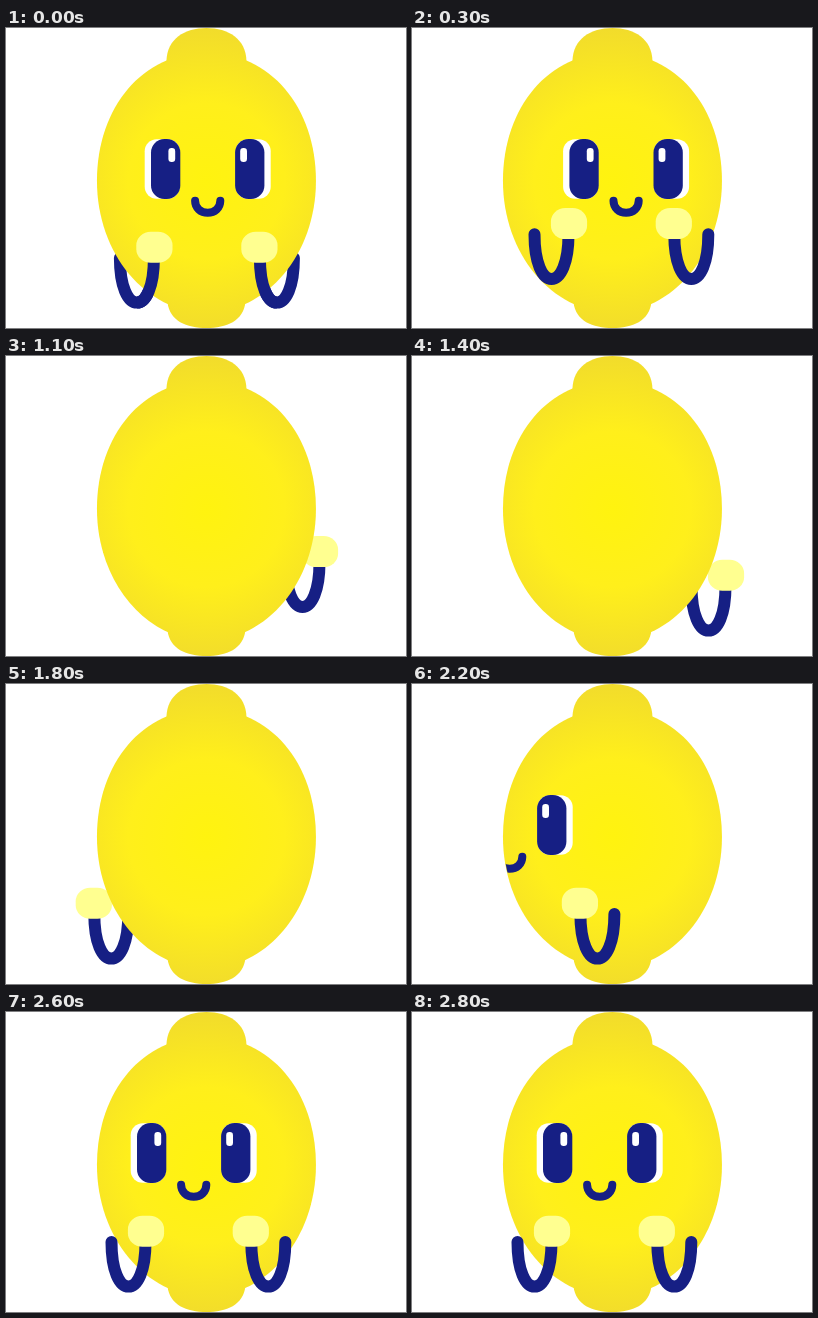
An HTML page for the animation above (2.9 s loop, 400 px wide and 300 px high).

```html
<!DOCTYPE html>
<html lang="en">
<head>
<meta charset="utf-8">
<title>Turning lemon</title>
<style>
  html, body { margin: 0; width: 100%; height: 100%; overflow: hidden; background: #fff; }
  svg { display: block; width: 100vw; height: 100vh; }
</style>
</head>
<body>
<svg viewBox="0 0 400 300">
  <defs>
    <radialGradient id="skin" gradientUnits="userSpaceOnUse" cx="0" cy="153" r="156">
      <stop offset="0" stop-color="#fff30f"/>
      <stop offset=".5" stop-color="#ffef1b"/>
      <stop offset="1" stop-color="#f1db2c"/>
    </radialGradient>
    <path id="fruit" d="M-109.5 153C-109.5 79-63.5 24.5 0 24.5S109.5 79 109.5 153C109.5 225.6 60.5 284.5 0 284.5S-109.5 225.6-109.5 153Z"/>
    <g id="lemon">
      <path d="M-40 33C-39.5 11-22 0 0 0S39.5 11 40 33V60H-40Z"/>
      <path d="M-39 274C-37 293-20 300 0 300S37 293 39 274V250H-39Z"/>
      <use href="#fruit"/>
    </g>
    <clipPath id="inside"><use href="#fruit"/></clipPath>
    <g id="eye">
      <rect x="-63" y="111.3" width="35" height="59.5" rx="12" fill="#fff"/>
      <rect x="-56.7" y="111" width="29.3" height="60" rx="13.5" fill="#161f84"/>
      <rect x="-39.3" y="120" width="6.8" height="14" rx="3.2" fill="#fff"/>
    </g>
    <g id="arm" fill="none" stroke="#161f84" stroke-width="12" stroke-linecap="round">
      <path d="M-17 230C-17 259-9 274.6 0 274.6S17 259 17 230"/>
    </g>
    <g id="forearm" fill="none" stroke="#161f84" stroke-width="12">
      <path d="M0 274.6C9 274.6 17 259 17 230"/>
    </g>
    <rect id="hand" x="-.6" y="203.8" width="36.2" height="31" rx="14.5" ry="13.5" fill="#ffff90"/>
  </defs>
  <g class="turning" id="back"></g>
  <use href="#lemon" fill="url(#skin)" transform="translate(200.45 0)"/>
  <g class="turning">
    <g clip-path="url(#inside)">
      <g id="face">
        <use href="#eye"/>
        <use href="#eye" transform="scale(-1 1)"/>
        <path d="M-12.6 172.8C-12.6 180-7 184.8 0 184.8S12.6 180 12.6 172.8"
              fill="none" stroke="#161f84" stroke-width="8" stroke-linecap="round"/>
      </g>
    </g>
    <g id="front"></g>
  </g>
</svg>
<script>
  const STEP = 100;
  // One letter per step; lower case is the mirrored pose, a space is the bare lemon.
  const SEQUENCE = 'ABBBCCDD  EEEEE eeee  ddccbbb';
  const AXIS = 200.9;
  const LIFT = -23.7;

  // Arms are [x, side of the hand].
  const POSES = {
    A: { face: 0.8, back: [[-70, 1], [70, -1]], front: [[-70, 1], [70, -1]], frontPart: 'forearm' },
    B: { face: 13.2, front: [[-61.4, 1], [78.4, -1]] },
    C: { face: 32.7, front: [[-26.4, 1], [94.7, 1]] },
    D: { face: 103.2, front: [[15.5, 1]] },
    E: { back: [[95.6, 1]] },
    ' ': {}
  };

  const byId = id => document.getElementById(id);
  const turning = document.querySelectorAll('.turning');
  const face = byId('face'), back = byId('back'), front = byId('front');

  const drawArms = (arms = [], part = 'arm', y) => arms.map(([x, side]) =>
    `<g transform="translate(${x} ${y}) scale(${side} 1)"><use href="#${part}"/><use href="#hand"/></g>`
  ).join('');

  let shown = -1;

  function render(time) {
    const step = Math.floor(time / STEP) % SEQUENCE.length;
    if (step === shown) return;
    shown = step;
    const key = SEQUENCE[step];
    const pose = POSES[key.toUpperCase()];
    const mirror = key !== key.toUpperCase() ? -1 : 1;
    const y = step % 2 ? LIFT : 0;

    for (const group of turning) {
      group.setAttribute('transform', `translate(${AXIS} 0) scale(${mirror} 1)`);
    }
    face.setAttribute('display', 'face' in pose ? 'inline' : 'none');
    face.setAttribute('transform', `translate(${pose.face || 0} 0)`);
    back.innerHTML = drawArms(pose.back, 'arm', y);
    front.innerHTML = drawArms(pose.front, pose.frontPart, y);
  }

  const start = performance.now();
  function tick() {
    render(performance.now() - start);
    requestAnimationFrame(tick);
  }
  tick();
</script>
</body>
</html>
```
